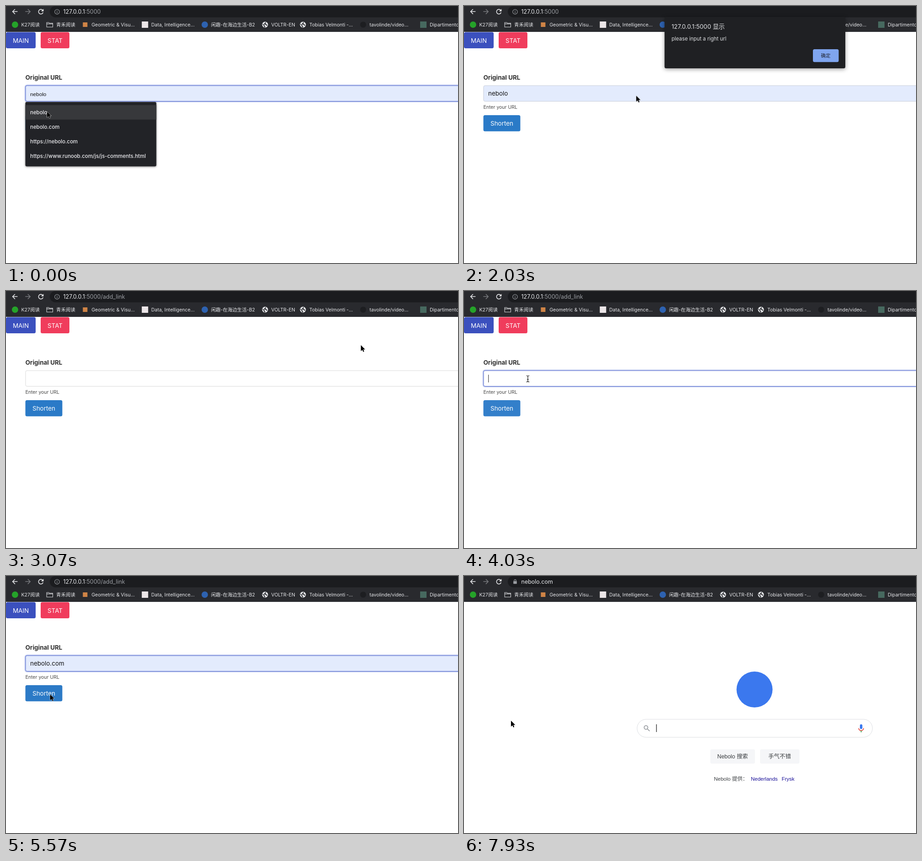
Animation, 991 px wide and 565 px high, one loop 8000 ms. Source, as an HTML page:

```html
<!DOCTYPE html>
<html lang="zh-CN">
<head>
<meta charset="utf-8">
<title>URL shortener</title>
<style>
html, body { margin: 0; width: 100%; height: 100%; overflow: hidden; background: #fff; }
svg { position: absolute; left: 0; top: 0; display: block; overflow: visible; }
text { font-family: Inter, 'Noto Sans CJK SC', 'Noto Sans CJK', sans-serif; white-space: pre; }
.page text { font-size: 13.45px; fill: #333; }
.page .label { font-weight: 700; fill: #303030; }
.page .btn { fill: #fff; text-anchor: middle; }
.page .help { font-size: 10.5px; fill: #484848; }
.page .preview { font: 11.8px 'Liberation Sans', Arial, sans-serif; fill: #111; }
.marks text { font-size: 10.5px; fill: #e6e7ea; }
.url text { font-size: 12.5px; fill: #e8eaed; }
.url .dim { fill: #9a9da2; }
.menu text { font-size: 11.45px; font-weight: 500; fill: #ededf0; }
.menu { filter: drop-shadow(0 1px 2px rgba(0,0,0,.5)); }
.search text { font: 12.4px 'Liberation Sans', Arial, 'Noto Sans CJK SC', 'Noto Sans CJK', sans-serif; fill: #3a3d40; }
.search .small { font-size: 11.5px; }
.search .link { fill: #1a1099; }
.field { fill: #fff; stroke: #d9d9d9; }

/* hard switches */
.s { animation: 8s step-end infinite; }
.off { opacity: 0; }
#form { animation-name: form; }
#done { animation-name: done; }
#find { animation-name: find; }
#stop { animation-name: stop; }
#site { animation-name: site; }
#path { fill: transparent; animation-name: path; }
#box { animation-name: box; }
#ring { animation-name: ring; }
#pre1 { animation-name: pre1; }
#pre2 { animation-name: pre2; }
#val1 { animation-name: val1; }
#val2 { animation-name: val2; }
#caret { animation-name: caret; }
#row { animation-name: row; }
#shorten { fill: #337fca; animation-name: shorten; }
#newbox { animation-name: newbox; }
#go { fill: #3b50be; animation-name: go; }
#ok { fill: #7fa5ef; animation-name: ok; }
#arrow { animation-name: arrow; }
#beam { animation-name: beam; }
@keyframes form { 0% { opacity: 1 } 74.625% { opacity: 0 } }
@keyframes done { 74.625% { opacity: 1 } 95.875% { opacity: 0 } }
@keyframes find { 95.875% { opacity: 1 } }
@keyframes stop {
  36.625%, 72.125%, 88.375% { opacity: 1 }
  38.375%, 75.375%, 99.125% { opacity: 0 }
}
@keyframes site { 93.75% { opacity: 1 } }
@keyframes path { 37.875% { fill: #9a9da2 } }
@keyframes box {
  0% { fill: #e3ebfd; stroke: #4159c6 }
  11.625% { fill: #e3ebfd; stroke: #c9ced9 }
  37.875% { fill: #fff; stroke: #d9d9d9 }
  42% { fill: #fff; stroke: #b5b5b5 }
  49.375% { fill: #fff; stroke: #4159c6 }
  57.7% { fill: #e3ebfd; stroke: #4159c6 }
  71.25% { fill: #e3ebfd; stroke: #c9ced9 }
}
@keyframes ring { 0%, 49.375% { opacity: 1 } 11.625%, 71.25% { opacity: 0 } }
@keyframes pre1 { 0%, 57.7% { opacity: 1 } .375%, 58.9% { opacity: 0 } }
@keyframes pre2 { 58.9% { opacity: 1 } 61.625% { opacity: 0 } }
@keyframes val1 { .375% { opacity: 1 } 37.875% { opacity: 0 } }
@keyframes val2 { 61.625% { opacity: 1 } }
@keyframes caret { 49.375%, 60.375% { opacity: 1 } 55.375%, 61.625% { opacity: 0 } }
@keyframes row {
  0%, 57.7% { opacity: 1; transform: none }
  50% { opacity: 0; transform: none }
  58.9% { opacity: 1; transform: translateY(31.9px) }
}
@keyframes shorten {
  7.6%, 68.5% { fill: #2c7ac6 }
  11.625%, 71.25% { fill: #2873bd }
  20.875% { fill: #2a7ac7 }
  45.375% { fill: #337fca }
}
@keyframes newbox { 80% { stroke: #b0b0b0 } 82.4% { stroke: #d9d9d9 } }
@keyframes go { 82.8% { fill: #364ab6 } 87.5% { fill: #3044ab } 91% { fill: #364ab6 } }
@keyframes ok { 33.5% { fill: #7499e6 } }
@keyframes arrow { 0%, 57.3%, 82.4% { opacity: 1 } 42%, 80% { opacity: 0 } }
@keyframes beam { 42%, 80% { opacity: 1 } 57.3%, 82.4% { opacity: 0 } }

/* smooth motion */
#menu { animation: menu 8s linear infinite; }
@keyframes menu {
  0%, .6% { opacity: 1 }
  2.2%, 52.3% { opacity: 0 }
  52.8%, 61.625% { opacity: 1 }
  62.75%, 99.99% { opacity: 0 }
  100% { opacity: 1 }
}
#alert {
  opacity: 0; transform-origin: 638px 137px;
  filter: drop-shadow(0 2px 5px rgba(0,0,0,.4));
  animation: alert 8s linear infinite;
}
@keyframes alert {
  0%, 15.25% { opacity: 0; transform: perspective(800px) rotateX(0deg) }
  16.25% { opacity: 1; transform: perspective(800px) rotateX(0deg) }
  34.625% {
    opacity: 1; transform: perspective(800px) rotateX(0deg);
    animation-timing-function: cubic-bezier(.333,0,.667,.333);
  }
  37.625%, 100% { opacity: 0; transform: perspective(800px) rotateX(27deg) }
}
#mouse { animation: mouse 8s ease-in-out infinite; }
@keyframes mouse {
  0%, 6.25% { transform: translate(90px,232px) }
  10.6%, 20.875% { transform: translate(86px,263px) }
  30.875%, 31.625% { transform: translate(786px,105px) }
  32.875%, 34.625% { transform: translate(778px,106px) }
  35.75%, 40.875% { transform: translate(778px,119px) }
  42.875%, 45.375% { transform: translate(690px,188px) }
  49.25%, 55.875% { transform: translate(140px,193px) }
  60.375%, 66.25% { transform: translate(128px,264px) }
  70%, 80.375% { transform: translate(96px,260px) }
  84.75%, 100% { transform: translate(103px,318px) }
}
</style>
</head>
<body>
<svg width="991" height="565" viewBox="0 0 991 565">
  <defs>
    <g id="globe">
      <circle r="6.5" fill="#e6e7ea"/>
      <path d="M-5.3-1.5l3.3 3.2v1.6l1.4 1v1.6M1-5.2v1.6l-2 1.2v1.6h3l1 2h2" fill="none" stroke="#292a2e" stroke-width="1.7"/>
    </g>
  </defs>

  <g class="page">
    <rect y="57.5" width="65" height="35.4" rx="3.5" fill="#3b50be"/>
    <text class="btn" x="32.5" y="80.5">MAIN</text>
    <rect x="76" y="57.5" width="63" height="35.4" rx="3.5" fill="#f03c5c"/>
    <text class="btn" x="107.5" y="80.5">STAT</text>
    <text class="label" x="42.5" y="162">Original URL</text>

    <g id="form" class="s">
      <rect id="ring" class="s off" x="41.9" y="174" width="1000" height="36.4" rx="4.2" fill="none" stroke="#cdd5f3" stroke-width="3"/>
      <rect id="box" class="s field" x="42.9" y="175" width="1000" height="34.5" rx="3.2"/>
      <text id="pre1" class="s off preview" x="53" y="197.5">nebolo</text>
      <text id="pre2" class="s off preview" x="53" y="197.5">nebolo.com</text>
      <text id="val1" class="s off" x="53" y="197.2" style="fill:#111">nebolo</text>
      <text id="val2" class="s off" x="53" y="197.2" style="fill:#111">nebolo.com</text>
      <rect id="caret" class="s off" x="53.2" y="184" width="1" height="17" fill="#222"/>
      <text class="help" x="42.5" y="225.5">Enter your URL</text>
      <rect id="shorten" class="s" x="42.5" y="240" width="81" height="35.4" rx="3.5"/>
      <text class="btn" x="83" y="263">Shorten</text>
    </g>

    <g id="done" class="s off">
      <rect x="150" y="57.5" width="107" height="35.4" rx="3.5" fill="#ffd97c"/>
      <text class="btn" x="203.2" y="80.5" style="fill:#4d4125">CLEAR_ALL</text>
      <rect class="field" x="42.9" y="175" width="1000" height="34.5" rx="3.2"/>
      <text x="53" y="197.2">https://nebolo.com</text>
      <text class="label" x="42.5" y="236.5">New URL</text>
      <rect id="newbox" class="s field" x="42.9" y="249.5" width="1000" height="34.5" rx="3.2"/>
      <text x="53" y="271.7">http://127.0.0.1:5000/PGS</text>
      <rect id="go" class="s" x="42.5" y="295" width="103.5" height="35.4" rx="3.5"/>
      <text class="btn" x="94.2" y="317.8">Go To Page</text>
    </g>
  </g>

  <g id="menu" class="menu">
    <rect x="42.5" y="211" width="287" height="141.5" rx="3" fill="#222327"/>
    <rect id="row" class="s off" x="42.5" y="217.8" width="287" height="31.9" fill="#37383b"/>
    <text x="53" y="238.2">nebolo</text>
    <text x="53" y="270">nebolo.com</text>
    <text x="53" y="302">https://nebolo.com</text>
    <text x="53" y="333.8">https://www.runoob.com/js/js-comments.html</text>
  </g>

  <g id="find" class="s off search">
    <rect y="57" width="991" height="508" fill="#fff"/>
    <circle cx="637" cy="249.5" r="39.5" fill="#3b78ee"/>
    <rect x="379.5" y="315" width="516" height="39.5" rx="19.75" fill="#fff" stroke="#dcdee2"/>
    <g fill="none" stroke="#8f9398" stroke-width="1.6">
      <circle cx="399" cy="333" r="4"/><path d="M402 336l5 5"/>
    </g>
    <rect x="421.3" y="326" width="1.3" height="17" fill="#222"/>
    <rect x="868" y="326" width="5.4" height="10.5" rx="2.7" fill="#3b78ee"/>
    <path d="M865.3 334.5a5.4 5.4 0 0 0 10.8 0" fill="none" stroke="#e6453a" stroke-width="1.6"/>
    <path d="M870.7 340v3.6" stroke="#35a04f" stroke-width="1.8"/>
    <g fill="#f5f6f8">
      <rect x="540" y="381" width="98" height="31.5" rx="3.5"/>
      <rect x="649" y="381" width="86.5" height="31.5" rx="3.5"/>
    </g>
    <g text-anchor="middle">
      <text x="589" y="401">Nebolo 搜索</text>
      <text x="692" y="401">手气不错</text>
    </g>
    <text class="small" x="548" y="449.5">Nebolo 提供：</text>
    <text class="small link" x="629" y="449.5">Nederlands</text>
    <text class="small link" x="696.5" y="449.5">Frysk</text>
  </g>

  <g class="url">
    <rect width="991" height="57" fill="#292a2e"/>
    <rect y="56" width="991" height="1" fill="#3c3d41"/>
    <rect x="96" y="0" width="920" height="25" rx="12.5" fill="#1b1c1f"/>
    <g fill="none" stroke-width="1.6">
      <path d="M25.3 12.3H14.8M19.8 7l-5.3 5.3 5.3 5.3" stroke="#e6e7ea"/>
      <path d="M42.3 12.3h10.5M47.8 7l5.3 5.3-5.3 5.3" stroke="#77787c"/>
      <path d="M80.4 9.3A5.1 5.1 0 1 0 81.3 14" stroke="#e6e7ea"/>
    </g>
    <path d="M82.4 6.3v5.4H77z" fill="#e6e7ea"/>
    <g id="stop" class="s off">
      <rect x="69" y="5" width="15" height="15" fill="#292a2e"/>
      <path d="M71.7 7.8l9 9M80.7 7.8l-9 9" stroke="#e6e7ea" stroke-width="1.6"/>
    </g>
    <circle cx="112" cy="12.7" r="5.2" fill="none" stroke="#9a9da2" stroke-width="1.1"/>
    <path d="M112 12v3.4M112 9.5v1.3" stroke="#9a9da2" stroke-width="1.2"/>
    <text x="125.5" y="17">127.0.0.1<tspan class="dim">:5000</tspan><tspan id="path" class="s">/add_link</tspan></text>
    <g id="site" class="s off">
      <rect x="104" y="1" width="190" height="23" fill="#1b1c1f"/>
      <rect x="108.2" y="11.3" width="7.6" height="6" rx=".8" fill="#9a9da2"/>
      <path d="M109.8 11.5v-1.4a2.2 2.2 0 0 1 4.4 0v1.4" fill="none" stroke="#9a9da2" stroke-width="1.1"/>
      <text x="125.5" y="17">nebolo.com</text>
    </g>
  </g>

  <g class="marks">
    <circle cx="19.8" cy="41" r="7" fill="#25a329"/>
    <path d="M89.2 36.2h4.6l1.4 1.6h7.3v8.4H89.2zM89.2 39.4h13.3" fill="none" stroke="#d5d6d9" stroke-width="1.1"/>
    <rect x="168.5" y="36" width="10" height="10" fill="#cf8446"/>
    <rect x="297.7" y="34" width="14" height="14" fill="#ece6e8"/>
    <circle cx="435.8" cy="41" r="7" fill="#2e62b0"/>
    <use href="#globe" x="568" y="41"/>
    <use href="#globe" x="651" y="41"/>
    <circle cx="783" cy="41" r="6.6" fill="#1d1e21"/>
    <rect x="908" y="34" width="14" height="14" fill="#47695f"/>
    <text x="33.5" y="44.7">K27阅读</text>
    <text x="110" y="44.7">青禾阅读</text>
    <text x="187.5" y="44.7">Geometric &amp; Visu...</text>
    <text x="318.5" y="44.7">Data, Intelligence...</text>
    <text x="449.5" y="44.7">闲趣-在海边生活-B2</text>
    <text x="581.5" y="44.7">VOLTR-EN</text>
    <text x="665" y="44.7">Tobias Velmonti -...</text>
    <text x="797" y="44.7">tavolinde/video...</text>
    <text x="929" y="44.7">Dipartimento</text>
  </g>
</svg>

<svg id="alert" width="991" height="565" viewBox="0 0 991 565">
  <rect x="439.7" y="24" width="396.3" height="113" rx="3.5" fill="#1f2023"/>
  <text x="455" y="50.3" font-size="13.2" fill="#e4e5e8">127.0.0.1:5000 显示</text>
  <text x="455" y="75.8" font-size="11.4" fill="#dfe0e3">please input a right url</text>
  <rect id="ok" class="s" x="765" y="95" width="56.5" height="28.3" rx="3.5"/>
  <text x="793" y="112.8" font-size="10.6" font-weight="500" fill="#202533" text-anchor="middle">确定</text>
</svg>

<svg width="991" height="565" viewBox="0 0 991 565">
  <g id="mouse">
    <path id="arrow" class="s" d="M0 0V13.2L3.1 10.3 5.1 14.8 7.3 13.9 5.3 9.4H9.4Z" fill="#000" stroke="#fff" stroke-width="1" paint-order="stroke"/>
    <g id="beam" class="s off" fill="none">
      <path d="M-3.3-7q2.6 0 3.3 1.5q.7-1.5 3.3-1.5M0-5.5V5.5M-3.3 7q2.6 0 3.3-1.5q.7 1.5 3.3 1.5M-1.8 1.5h3.6" stroke="#fff" stroke-width="2.6"/>
      <path d="M-3.3-7q2.6 0 3.3 1.5q.7-1.5 3.3-1.5M0-5.5V5.5M-3.3 7q2.6 0 3.3-1.5q.7 1.5 3.3 1.5M-1.8 1.5h3.6" stroke="#111" stroke-width="1.2"/>
    </g>
  </g>
</svg>
</body>
</html>
```
